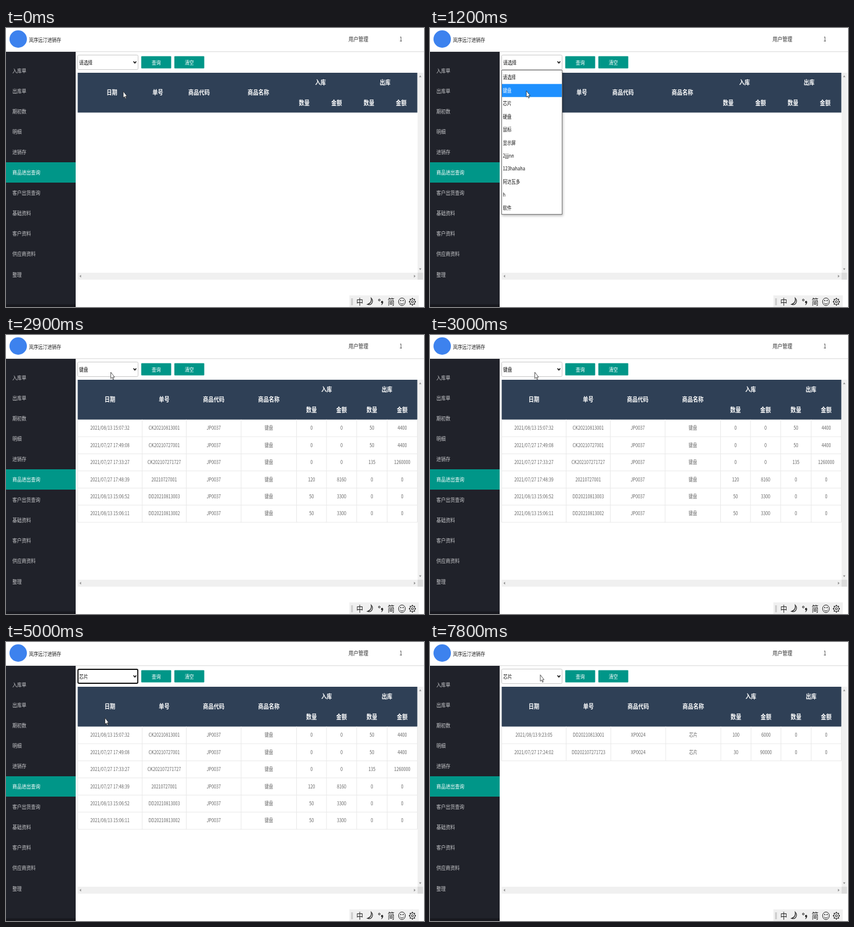
These frames come from a looping animation (720x480 px, 8000 ms). An HTML page:

```html
<!DOCTYPE html>
<html lang="zh-CN">
<head>
<meta charset="utf-8">
<title>商品进出查询</title>
<style>
  html, body { margin: 0; width: 100%; height: 100%; overflow: hidden; background: #fff; }
  svg { display: block; width: 720px; height: 480px; }
  text { font-family: "Noto Sans CJK SC", "Noto Sans CJK", "Noto Sans CJK JP", "Noto Sans", sans-serif; }
  #menu { filter: drop-shadow(1.5px 2px 2px rgba(0, 0, 0, .3)); }
</style>
</head>
<body>
<svg id="stage" viewBox="0 0 720 480" xmlns="http://www.w3.org/2000/svg"></svg>
<script>
const LOOP = 8000, STEP = 100;
const SQUEEZE = 0.844; // a 16:9 screen shown at 3:2
const TEAL = '#009688', NAVY = '#2f4056';

const sidebar = ['入库单', '出库单', '期初数', '明细', '进销存', '商品进出查询',
  '客户出货查询', '基础资料', '客户资料', '供应商资料', '整理'];
const options = ['请选择', '键盘', '芯片', '硬盘', '鼠标', '显示屏', '2jjjnn',
  '123hahaha', '阿达瓦多', 'h', '软件'];
const OPT_TOP = 73.9, OPT_H = 22.43;

const tables = [
  { from: 0, edges: [123.5, 241.5, 281.5, 383.5, 486, 541.5, 597.5, 653, 708.5], rows: [] },
  { from: 2900, edges: [123.5, 234.5, 310.5, 405, 500.5, 552, 604, 656.5, 708.5], rows: [
    '2021/08/13 15:07:32|CK20210813001|JP0037|键盘|0|0|50|4400',
    '2021/07/27 17:49:08|CK20210727001|JP0037|键盘|0|0|50|4400',
    '2021/07/27 17:33:27|CK202107271727|JP0037|键盘|0|0|135|1260000',
    '2021/07/27 17:48:39|20210727001|JP0037|键盘|120|8160|0|0',
    '2021/08/13 15:06:52|DD20210813003|JP0037|键盘|50|3300|0|0',
    '2021/08/13 15:06:11|DD20210813002|JP0037|键盘|50|3300|0|0'] },
  { from: 7000, edges: [123.5, 234.5, 311.5, 406, 501, 553, 604.5, 656.5, 708.5], rows: [
    '2021/08/13 9:23:05|DD20210813001|XP0024|芯片|100|6000|0|0',
    '2021/07/27 17:24:02|DD202107271723|XP0024|芯片|30|90000|0|0'] }
];

// time, x, y of the pointer tip
const path = [
  [0, 202, 109], [400, 190, 62], [500, 188, 61], [700, 171, 96], [1000, 166, 108],
  [1200, 166, 108], [1600, 256, 61], [1800, 256, 61], [2100, 180.5, 64], [3400, 180.5, 64],
  [3700, 188.5, 60], [3900, 188.5, 60], [4600, 171, 129], [5000, 170.5, 130.5],
  [5100, 170.5, 130.5], [5600, 257, 61], [5800, 257, 61], [6200, 190, 62],
  [7400, 190, 62], [7800, 190, 56.5], [LOOP, 190, 56.5]
];
const picks = [[0, 0], [1300, 1], [4900, 2]]; // time, chosen option
const openSpans = [[500, 1300], [3800, 4900]];
const focusSpans = [[1300, 1700], [4900, 5700]];

const rect = (x, y, w, h, fill, extra = '') =>
  `<rect x="${x}" y="${y}" width="${w}" height="${h}" fill="${fill}" ${extra}/>`;
const line = (d, color, width = 1) =>
  `<path d="${d}" fill="none" stroke="${color}" stroke-width="${width}"/>`;
const shape = (d, fill) => `<path d="${d}" fill="${fill}"/>`;
// y is the middle of the glyphs
const label = (s, x, y, size, fill, anchor = 'middle', extra = '') =>
  `<text transform="translate(${x} ${y + size * 0.37}) scale(${SQUEEZE} 1)" font-size="${size}"` +
  ` fill="${fill}" text-anchor="${anchor}" ${extra}>${s}</text>`;
const group = (id, body, hidden) =>
  `<g id="${id}"${hidden ? ' display="none"' : ''}>${body}</g>`;

function drawHeader() {
  return rect(0, 40, 720, 1.3, '#e0e0e0') +
    '<circle cx="21" cy="19" r="15" fill="#3d82ee"/>' +
    label('岚序远汀进销存', 39.5, 20.5, 9.4, '#222', 'start') +
    label('用户管理', 607, 19.5, 10.1, '#333') +
    label('1', 680, 19.5, 10.1, '#333');
}

function drawSidebar() {
  return rect(0, 41, 120, 439, '#20222a') + rect(0, 475.5, 120, 4.5, '#17181e') +
    rect(0, 231, 120, 35, TEAL) +
    sidebar.map((s, i) =>
      label(s, 11, 73 + i * 35.1, 9.5, s === '商品进出查询' ? '#fff' : '#c6c7ca', 'start')).join('');
}

function drawToolbar() {
  const button = (s, x) => rect(x, 48.5, 51.5, 21, TEAL, 'rx="1"') + label(s, x + 25.8, 59.7, 9.4, '#fff');
  return rect(123.5, 46.5, 104, 25, '#fff', 'rx="2" stroke="#c8c8c8"') +
    group('ring', rect(124, 47, 103, 24, 'none', 'rx="2" stroke="#111" stroke-width="1.8"'), true) +
    options.slice(0, 3).map((s, i) => group('value' + i, label(s, 126, 59.2, 9.1, '#111', 'start'), true)).join('') +
    line('M219.6 57.5L222 60.3L224.4 57.5', '#111', 1.6) +
    button('查询', 233) + button('清空', 290);
}

function drawScrollbars() {
  return rect(709, 77, 9.5, 344, '#f0f0f0') + rect(123.5, 421, 585.5, 12, '#f0f0f0') +
    rect(709, 421, 9.5, 12, '#dcdcdc') +
    shape('M711.5 84.5h4l-2-3zM711.5 413.5h4l-2 3zM129.3 424.5v5l-2.6-2.5zM702.7 424.5v5l2.6-2.5z', '#8f8f8f');
}

function drawTable({ edges, rows }, n) {
  const mid = (a, b) => (edges[a] + edges[b]) / 2;
  const head = (s, x, y) => label(s, x, y, 10.9, '#fff', 'middle', 'font-weight="700"');
  let out = rect(123.5, 77, 585, 68.5, NAVY);
  ['日期', '单号', '商品代码', '商品名称'].forEach((s, i) => out += head(s, mid(i, i + 1), 111));
  out += head('入库', mid(4, 6), 94.3) + head('出库', mid(6, 8), 94.3);
  for (let i = 4; i < 8; i++) out += head(i % 2 ? '金额' : '数量', mid(i, i + 1), 128.6);

  const top = 145.5, rowH = 29.45, bottom = top + rowH * rows.length;
  rows.forEach((row, r) => {
    const y = top + r * rowH;
    out += line(`M123.5 ${y + rowH}H708.5`, '#e9e9e9');
    row.split('|').forEach((s, c) => out += label(s, mid(c, c + 1), y + 14.5, 8.6, '#666'));
  });
  if (rows.length) edges.forEach(x => out += line(`M${x} ${top}V${bottom}`, '#e9e9e9'));
  return group('table' + n, out, true);
}

function drawMenu() {
  return group('menu',
    rect(123.5, 72.5, 104, 248, '#fff', 'stroke="#777"') +
    rect(124, OPT_TOP, 103, OPT_H, '#1e90ff', 'id="hot"') +
    options.map((s, i) =>
      `<g class="option">${label(s, 125.5, OPT_TOP + (i + 0.5) * OPT_H, 8.8, 'currentColor', 'start')}</g>`).join(''),
    true);
}

function drawInputBar() {
  const ink = '#222';
  let teeth = '';
  for (let i = 0; i < 8; i++) {
    const a = i * Math.PI / 4, c = Math.cos(a), s = Math.sin(a);
    teeth += `M${700 + 4.4 * c} ${471 + 4.9 * s}L${700 + 5.9 * c} ${471 + 6.6 * s}`;
  }
  return rect(591.5, 460, 119.5, 20, '#f0f0f0') + rect(594.5, 465, 3, 12, '#cbcbcb') +
    label('中', 609.5, 471.3, 14, ink) + label('简', 663.5, 471.3, 14, ink) +
    line('M629 464.5C634 470 630 478 622.5 475.5C628 474 630 469.5 629 464.5Z', ink, 1.1) +
    '<circle cx="643" cy="468" r="1.5" fill="none" stroke="#222"/>' +
    shape('M646 471.2a1.8 1.9 0 1 1 3.6 .3q0 3.6 -2.9 5.2l-.5 -.7q1.5 -1 1.6 -2.6q-1.8 .1 -1.8 -2.2z', ink) +
    '<ellipse cx="682" cy="471" rx="5.8" ry="6.5" fill="none" stroke="#222"/>' +
    '<circle cx="680" cy="469" r=".9"/><circle cx="684" cy="469" r=".9"/>' +
    line('M678.7 472.8Q682 477 685.3 472.8', ink) +
    '<ellipse cx="700" cy="471" rx="4.4" ry="4.9" fill="none" stroke="#222"/>' +
    '<ellipse cx="700" cy="471" rx="1.7" ry="1.9" fill="none" stroke="#222"/>' +
    line(teeth, ink, 1.8);
}

const pointer = group('pointer',
  '<path d="M0 0V11L2.2 8.9L3.8 12.7L5.2 12L3.7 8.4H6.5Z" fill="#fff" stroke="#222" stroke-width=".75"/>');

const $ = id => document.getElementById(id);
$('stage').innerHTML = rect(0, 0, 720, 480, '#fff') + drawHeader() + drawSidebar() + drawToolbar() +
  drawScrollbars() + tables.map(drawTable).join('') + drawInputBar() + drawMenu() + pointer;
const optionNodes = [...document.querySelectorAll('.option')];

const show = (id, on) => $(id).setAttribute('display', on ? 'inline' : 'none');
const within = (spans, t) => spans.some(([a, b]) => t >= a && t < b);
const latest = (times, t) => times.filter(a => a <= t).length - 1;

function pointerAt(t) {
  const i = path.findIndex(p => p[0] > t);
  const [t0, x0, y0] = path[i - 1], [t1, x1, y1] = path[i];
  const u = (t - t0) / (t1 - t0), k = u * u * (3 - 2 * u);
  return [x0 + (x1 - x0) * k, y0 + (y1 - y0) * k];
}

function render(t) {
  const [x, y] = pointerAt(t);
  const picked = picks[latest(picks.map(p => p[0]), t)][1];
  const table = latest(tables.map(v => v.from), t);
  const under = Math.floor((y - OPT_TOP) / OPT_H);
  const hot = under < 0 ? picked : under;

  $('pointer').setAttribute('transform', `translate(${x} ${y})`);
  tables.forEach((_, i) => show('table' + i, i === table));
  for (let i = 0; i < 3; i++) show('value' + i, i === picked);
  show('ring', within(focusSpans, t));
  show('menu', within(openSpans, t));
  $('hot').setAttribute('y', OPT_TOP + hot * OPT_H);
  optionNodes.forEach((n, i) => n.setAttribute('color', i === hot ? '#fff' : '#111'));
}

const start = performance.now();
function tick() {
  const t = (performance.now() - start) % LOOP;
  render(Math.floor(t / STEP) * STEP);
  requestAnimationFrame(tick);
}
tick();
</script>
</body>
</html>
```
